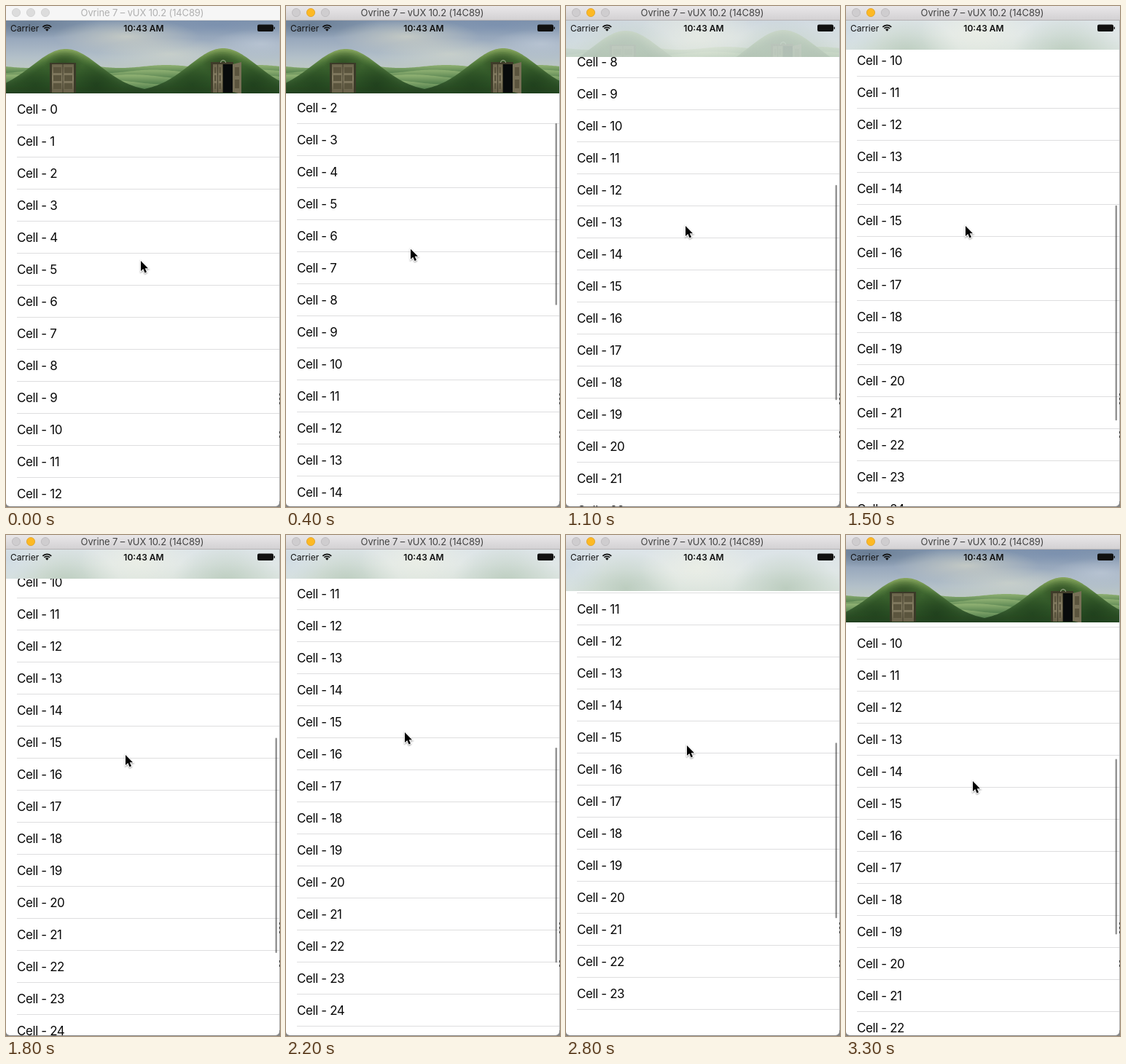
An HTML page with a canvas for the animation above (3400 ms loop, 376x688 px).

```html
<!DOCTYPE html>
<html lang="en">
<head>
<meta charset="utf-8">
<title>Collapsing header</title>
<style>
html, body { margin: 0; width: 100%; height: 100%; overflow: hidden; background: #fff; }
canvas { display: block; width: 376px; height: 688px; }
</style>
</head>
<body>
<canvas id="stage"></canvas>
<script>
const W = 376, H = 688, LOOP = 3400, STEP = 100;
const ROW = 44, ROWS = 30, BOTTOM = 687, OPEN = 120, SHUT = 60;
const PULL = 2685; // the moment the list starts moving back down
const FONT = 'Inter, Roboto, sans-serif';
const canvas = document.getElementById('stage');
const ctx = canvas.getContext('2d');
const dpr = window.devicePixelRatio || 1;
canvas.width = W * dpr;
canvas.height = H * dpr;

const ramp = (t, from, to) => Math.min(1, Math.max(0, (t - from) / (to - from)));
const sineOut = u => Math.sin(u * Math.PI / 2);

// Everything that moves, as a function of time
function pose(t) {
  const drag = ramp(t, 1800, 2200);
  const back = ramp(t, 2616, 3300);
  const head = OPEN + (SHUT - OPEN) * (ramp(t, 433, 1233) - ramp(t, PULL, 3091));
  const opening = t > PULL;
  return {
    active: t >= 200,
    scroll: 517 * sineOut(ramp(t, 239, 1680)) + 28 * drag - 112 * ramp(t, PULL, 3300),
    head: Math.round(head),
    layout: opening ? OPEN : Math.max(SHUT, head - 10),
    blur: opening ? 1 - ramp(t, 2800, 3100) : ((OPEN - head) / (OPEN - SHUT)) ** 1.3,
    x: 185 - 21 * ramp(t, 0, 600) - drag + 11 * back,
    y: 350 + 60 * ramp(t, 0, 200) - 108 * sineOut(ramp(t, 200, 600)) - 31 * drag + 67 * back
  };
}

function rect(x, y, w, h, fill) {
  ctx.fillStyle = fill;
  ctx.fillRect(x, y, w, h);
}

function text(str, x, y, font, fill, align = 'left', spacing = 0) {
  ctx.font = font + ' ' + FONT;
  ctx.letterSpacing = spacing + 'px';
  ctx.textAlign = align;
  ctx.fillStyle = fill;
  ctx.fillText(str, x, y);
}

function fade(y0, y1, ...colors) {
  const g = ctx.createLinearGradient(0, y0, 0, y1);
  colors.forEach((c, i) => g.addColorStop(i / (colors.length - 1), c));
  return g;
}

// Soft elliptical spot; rgb is "r,g,b"
function spot(x, y, rx, ry, rgb, alpha) {
  ctx.save();
  ctx.translate(x, y);
  ctx.scale(rx, ry);
  const g = ctx.createRadialGradient(0, 0, 0, 0, 0, 1);
  g.addColorStop(0, `rgba(${rgb},${alpha})`);
  g.addColorStop(1, `rgba(${rgb},0)`);
  rect(-1, -1, 2, 2, g);
  ctx.restore();
}

function ground(profile, fill) {
  ctx.beginPath();
  ctx.moveTo(0, 122);
  for (let x = 0; x <= W; x += 2) ctx.lineTo(x, profile(x));
  ctx.lineTo(W, 122);
  ctx.fillStyle = fill;
  ctx.fill();
}

function mound(cx, top) {
  const profile = x => 118 - (118 - top) * Math.exp(-(((x - cx) / 66) ** 2));
  ground(profile, fade(top, 120, '#86a45c', '#567f40', '#3a6131', '#223f20'));
  ctx.save();
  ctx.clip();
  // Darker layers inside leave a soft lit rim along the crest
  for (let i = 1; i <= 5; i++) {
    ground(x => profile(x) + i * 2.5, 'rgba(38,76,34,.13)');
  }
  spot(cx + 42, 108, 36, 32, '22,50,22', .5);
  spot(cx - 42, 108, 36, 28, '24,54,24', .4);
  spot(cx - 3, 80, 26, 18, '30,52,22', .5);
  ctx.restore();
}

function panel(x, w) {
  rect(x, 80, w, 39, fade(80, 119, '#6b644b', '#877f65', '#655e47'));
  for (let y = 84; y < 115; y += 11) {
    for (const side of [0, 1]) rect(x + 2 + side * w / 2, y, w / 2 - 4, 8, '#5b553e');
  }
  rect(x + w / 2 - .5, 80, 1, 39, '#413c2b');
}

function landscape() {
  rect(0, 20, W, 102, fade(20, 96, '#8094ad', '#99a9bd', '#b3c0c9', '#c5cfc0'));
  spot(30, 25, 100, 20, '88,108,130', .6);
  spot(290, 26, 100, 16, '110,134,172', .4);
  spot(165, 42, 100, 24, '214,215,200', .7);
  spot(225, 66, 100, 22, '214,218,204', .6);
  spot(350, 52, 70, 20, '197,207,220', .6);
  for (let i = 0; i < 5; i++) {
    ground(x => 83 + i * 7 + (2 + i / 2) * Math.sin(x / (20 + i * 3) + i * 2.2),
      fade(82 + i * 7, 96 + i * 7, '#8bad70', '#447344'));
  }
  mound(82, 59);
  mound(298, 58);
  rect(60, 78, 36, 41, '#3b3a28');
  panel(63, 30);
  rect(281, 77, 31, 42, '#3f3c29');
  panel(284, 13);
  rect(298, 80, 13, 39, '#080b0b');
  ctx.fillStyle = '#777057';
  ctx.beginPath();
  ctx.moveTo(311, 80);
  ctx.lineTo(323, 77);
  ctx.lineTo(323, 121);
  ctx.lineTo(311, 118);
  ctx.fill();
  for (const y of [84, 101]) rect(314, y, 6, 12, '#5b553e');
  ctx.strokeStyle = '#a9b398';
  ctx.lineWidth = 1;
  ctx.beginPath();
  ctx.arc(298, 78, 3.5, Math.PI, 0);
  ctx.stroke();
}

function frost(alpha) {
  ctx.globalAlpha = alpha;
  rect(0, 20, W, 102, fade(20, 120, '#d9e1e9', '#e0e7e7', '#d1ddd1'));
  for (const x of [82, 302]) spot(x, 95, 75, 51, '180,199,183', .78);
  spot(0, 63, 55, 45, '197,212,224', .6);
  spot(180, 66, 80, 45, '236,239,229', .8);
  ctx.globalAlpha = 1;
}

function header(head, blur) {
  ctx.save();
  ctx.beginPath();
  ctx.rect(0, 20, 375, head - 20);
  ctx.clip();
  ctx.translate(0, (head - OPEN) / 2);
  landscape();
  frost(blur);
  ctx.restore();
}

function statusBar() {
  text('Carrier', 6, 35, '400 12px', '#111');
  text('10:43 AM', 189, 35, '600 12px', '#111', 'center');
  ctx.strokeStyle = ctx.fillStyle = '#111';
  ctx.lineWidth = 1.7;
  const a = -Math.PI * .76, b = -Math.PI * .24;
  for (const r of [8.2, 5.2]) {
    ctx.beginPath();
    ctx.arc(56.3, 34.5, r, a, b);
    ctx.stroke();
  }
  ctx.beginPath();
  ctx.moveTo(56.3, 34.8);
  ctx.arc(56.3, 34.5, 3, a, b);
  ctx.fill();
  ctx.beginPath();
  ctx.roundRect(345, 25.5, 22, 9.5, 2);
  ctx.roundRect(367.6, 28.5, 1.4, 3.5, 1);
  ctx.fill();
}

function titleBar(active) {
  rect(0, 0, W, 20, active ? fade(0, 20, '#e9e7e9', '#d2d0d2') : '#f6f6f6');
  rect(0, 19, W, 1, active ? '#b5b3b5' : '#d8d8d8');
  for (const x of [14, 34, 54]) {
    const lit = active && x === 34;
    ctx.beginPath();
    ctx.arc(x, 9, 5.6, 0, 7);
    ctx.fillStyle = lit ? '#fdb924' : active ? '#cfcdcf' : '#dcdcdc';
    ctx.fill();
    ctx.strokeStyle = lit ? '#dfa023' : active ? '#bbb9bb' : '#cdcdcd';
    ctx.lineWidth = .8;
    ctx.stroke();
  }
  text('Ovrine 7 – vUX 10.2 (14C89)', 187, 14, '400 13px', active ? '#434343' : '#b0b0b0', 'center', -.13);
}

function table({ scroll, head, layout, active }) {
  const offset = scroll - (OPEN - head);
  const view = BOTTOM - layout;
  ctx.save();
  ctx.beginPath();
  ctx.rect(0, head, W, BOTTOM - head);
  ctx.clip();
  for (let k = 0; k < ROWS && k * ROW - offset < view; k++) {
    const y = Math.round(OPEN + k * ROW - scroll);
    text('Cell - ' + k, 15, y + 28, '400 17px', '#080808', 'left', -.4);
    rect(15, y + 43, 361, 1, '#dededf');
  }
  ctx.restore();
  if (!active) return;
  const scale = view / (ROW * ROWS);
  ctx.fillStyle = 'rgba(0,0,0,.42)';
  ctx.beginPath();
  ctx.roundRect(369.5, head + 1.5 + offset * scale, 2.5, view * scale - 2.5, 1.25);
  ctx.fill();
}

function pointer(x, y) {
  const p = new Path2D('M0 0V14L3.3 11L5.6 16.4L8 15.3L5.7 10.2H10Z');
  ctx.save();
  ctx.translate(x, y);
  ctx.shadowColor = 'rgba(0,0,0,.4)';
  ctx.shadowBlur = 2 * dpr;
  ctx.shadowOffsetY = dpr;
  ctx.strokeStyle = '#fff';
  ctx.lineWidth = 2;
  ctx.stroke(p);
  ctx.shadowColor = 'transparent';
  ctx.fillStyle = '#000';
  ctx.fill(p);
  ctx.restore();
}

function windowEdge() {
  rect(375, 20, 1, 668, '#b4b4b4');
  for (const y of [532, 538, 544, 584, 590]) rect(375, y, 1, 3, '#333');
  // Everything outside the rounded bottom corners
  ctx.fillStyle = '#858585';
  ctx.beginPath();
  ctx.rect(0, 680, W, 8);
  ctx.roundRect(0, 680, 375, 7, [0, 0, 5, 5]);
  ctx.fill('evenodd');
}

function draw(t) {
  const p = pose(t);
  ctx.setTransform(dpr, 0, 0, dpr, 0, 0);
  rect(0, 0, W, H, '#fff');
  table(p);
  header(p.head, p.blur);
  statusBar();
  titleBar(p.active);
  windowEdge();
  pointer(p.x, p.y);
}

const start = performance.now();
function tick() {
  const t = (performance.now() - start) % LOOP;
  draw(Math.floor(t / STEP) * STEP);
  requestAnimationFrame(tick);
}
tick();
</script>
</body>
</html>
```
